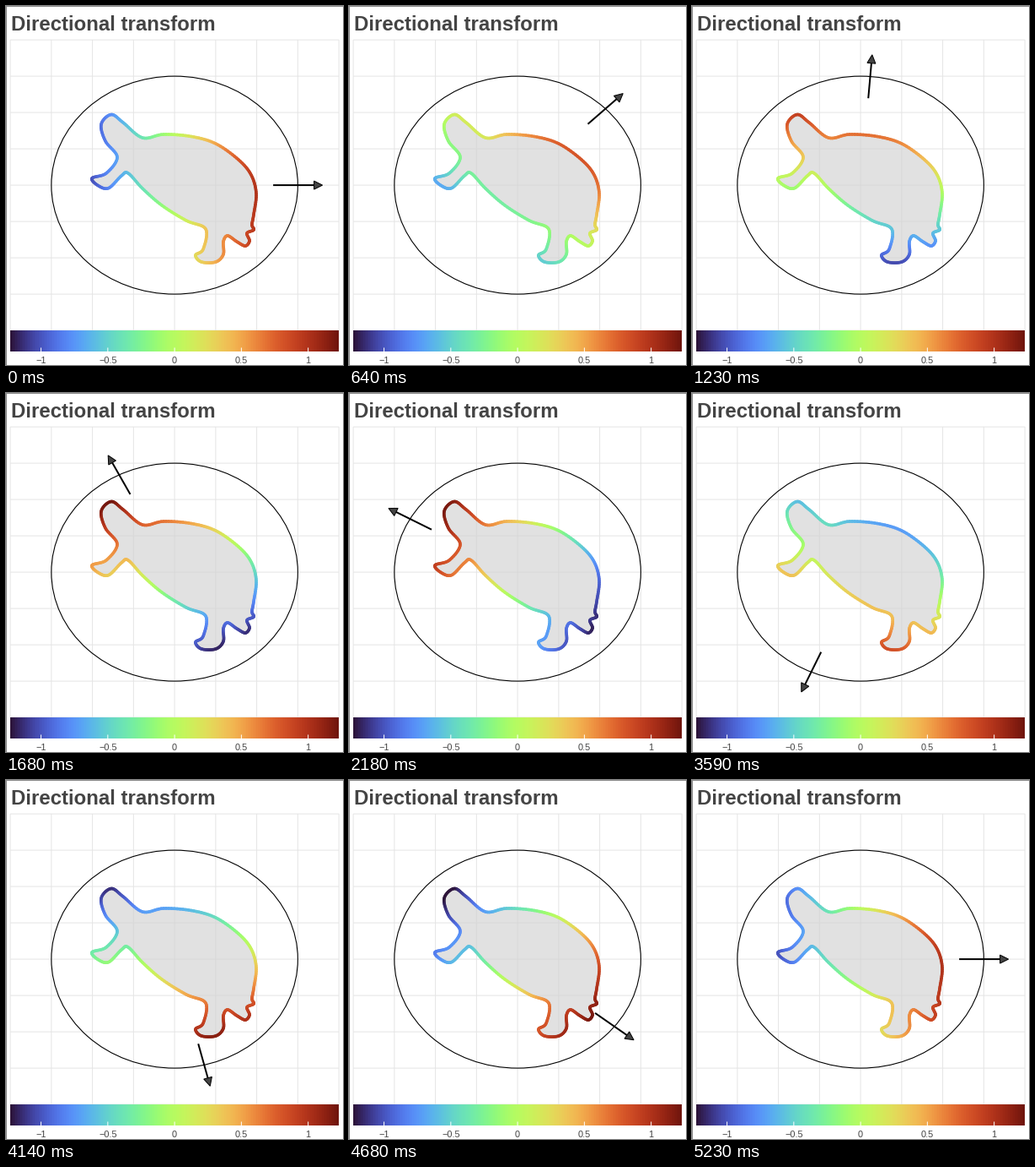
Recreate the animation shown at these times as a matplotlib script. Size 400x425 px, loop 5.28 s.

```python
import matplotlib.pyplot as plt
import numpy as np
from matplotlib.animation import FuncAnimation
from matplotlib.collections import LineCollection
from matplotlib.colors import ListedColormap
from matplotlib.patches import Ellipse, Polygon

W, H, DPI = 400, 425, 100
PX = 72 / DPI                          # points per pixel
CENTER = np.array([200.1, 212.1])
UNIT = np.array([97.5, -86.0])         # pixels per data unit
VMAX = 1.23
LOOP, STEP, FPS, LAST = 5280, 20, 22, 115
SANS, INK, GRID = "Liberation Sans", "#444444", "#e5e5e5"

# Key points of the turtle, clockwise from the head
TURTLE = np.array([
    (125, 128.5), (139, 138), (162, 156), (187, 152), (220, 154.5), (249, 163),
    (276, 182), (291, 200), (297, 222), (294, 247), (292, 259), (294, 265),
    (286, 269), (289, 278), (284, 284), (274, 279), (263, 272), (258, 279),
    (258, 294), (249, 303), (232, 303), (225, 295), (234, 288), (237, 264),
    (214, 254), (185, 236), (162, 216), (145, 198), (137, 201), (122, 215.5),
    (110, 213), (102, 204), (119, 198), (132, 179), (118, 160), (113, 140),
])


def closed_curve(p, n=10):
    """Catmull-Rom curve through the points p."""
    t = np.linspace(0, 1, n, endpoint=False)[None, :, None]
    a, b, c, d = (np.roll(p, s, axis=0)[:, None] for s in (1, 0, -1, -2))
    q = b + 0.5 * t * (c - a + t * (2*a - 5*b + 4*c - d + t * (3*(b - c) + d - a)))
    return q.reshape(-1, 2)


def display_p3(rgb):
    """Wide-gamut screen values of sRGB colours."""
    lin = np.where(rgb <= 0.04045, rgb / 12.92, ((rgb + 0.055) / 1.055) ** 2.4)
    lin = lin @ np.array([[0.8225, 0.0332, 0.0171],
                          [0.1774, 0.9669, 0.0724],
                          [0.0, 0.0, 0.9108]])
    out = np.where(lin <= 0.0031308, lin * 12.92, 1.055 * lin ** (1 / 2.4) - 0.055)
    return np.clip(out, 0, 1)


turbo = ListedColormap(display_p3(plt.get_cmap("turbo")(np.arange(256))[:, :3]))

fig = plt.figure(figsize=(W / DPI, H / DPI), dpi=DPI, facecolor="white")
ax = fig.add_axes([0, 0, 1, 1])


def line(xs, ys, color, width=1, z=1):
    return ax.plot(xs, ys, color=color, lw=width * PX, zorder=z,
                   solid_capstyle="butt", snap=False)[0]


# Window edge, grid and title
line([0.5, 0.5], [0, H], "#8c8c8c")
line([0, W], [0.5, 0.5], "#8c8c8c")
(left, top), (right, bottom) = CENTER + np.outer([-2, 2], abs(UNIT))
for k in np.arange(-2, 2.1, 0.5):
    x, y = CENTER + k * UNIT
    line([x, x], [top, bottom], GRID)
    line([left, right], [y, y], GRID)
ax.text(5.6, 28.8, "Directional transform", family=SANS, weight="bold",
        size=24 * PX, color=INK, va="baseline")

# Colour bar
ax.imshow(np.linspace(0, 1, 256)[None], cmap=turbo, aspect="auto",
          interpolation="nearest", extent=(5, 395, 409.5, 384.5), zorder=2)
for v in (-1, -0.5, 0, 0.5, 1):
    x = CENTER[0] + 195 * v / VMAX
    line([x, x], [404.5, 409.5], "white", z=3)
    ax.text(x, 422.6, f"{v:g}".replace("-", "\u2212"), family=SANS, size=11 * PX,
            color=INK, ha="center", va="baseline")

# Circle and turtle
outline = closed_curve(TURTLE)
ax.add_patch(Polygon(outline, fc="lightgray", ec="none", alpha=0.68, zorder=2))
ax.add_patch(Ellipse(CENTER, *(3 * abs(UNIT)), fc="none", ec="black",
                     lw=1.1 * PX, zorder=3))
segments = np.stack([outline, np.roll(outline, -1, axis=0)], axis=1)
mids = (segments.mean(axis=1) - CENTER) / UNIT
rim = LineCollection(segments, cmap=turbo, linewidths=3.6 * PX,
                     capstyle="round", zorder=4)
rim.set_clim(-VMAX, VMAX)
ax.add_collection(rim)

# Arrow
shaft = line([0, 0], [0, 0], "black", 2, 5)
head = Polygon(np.zeros((3, 2)), fc=INK, ec="black", lw=PX,
               joinstyle="miter", zorder=6)
ax.add_patch(head)

ax.set_xlim(0, W)
ax.set_ylim(H, 0)
ax.axis("off")


def angle(u):
    """One turn, slightly ahead at first and behind later."""
    return 2 * np.pi * u + np.radians(np.sin(2 * np.pi * u))


def draw(i):
    t = (i + 0.5) * STEP / 1000
    a = angle(min(int(t * FPS + 0.1), LAST) / LAST)
    way = np.array([np.cos(a), np.sin(a)])
    rim.set_array(mids @ way)
    tail, tip = (CENTER + r * way * UNIT for r in (1.2, 1.8))
    u = (tip - tail) / np.hypot(*(tip - tail))
    side = np.array([-u[1], u[0]])
    base = tip - 10 * u
    shaft.set_data(*np.transpose([tail, base]))
    head.set_xy([tip, base + 5 * side, base - 5 * side])
    return rim, shaft, head


anim = FuncAnimation(fig, draw, frames=LOOP // STEP, interval=STEP,
                     repeat=True, repeat_delay=0, blit=False)
plt.show()
```
